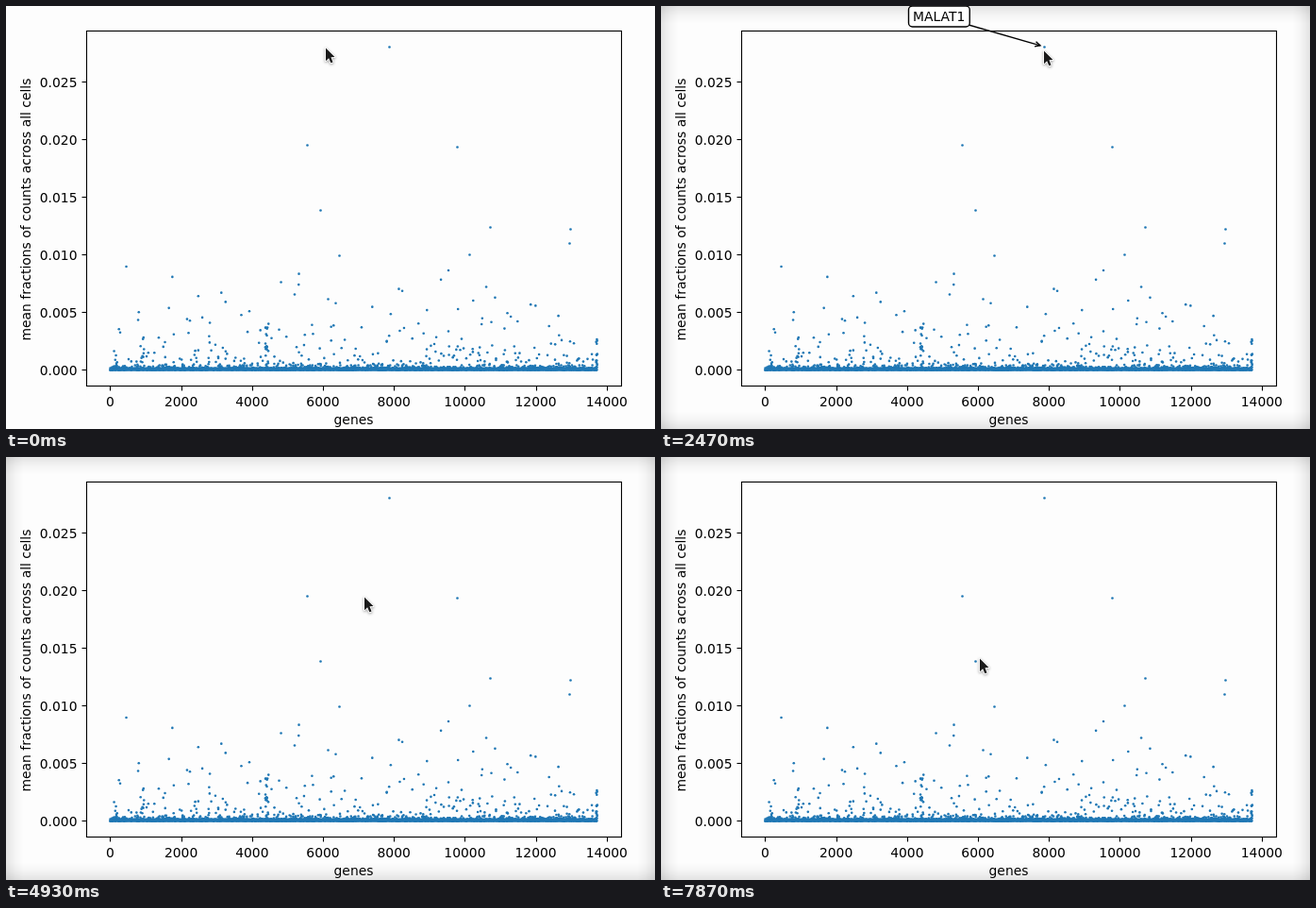
An HTML page with a canvas that plays this animation: 688x448 px, repeating every 8 s.

```html
<!DOCTYPE html>
<html lang="en">
<head>
<meta charset="utf-8">
<title>Gene fractions</title>
<style>
html, body { margin: 0; width: 688px; height: 448px; overflow: hidden; background: #fdfdfd; }
canvas { display: block; }
</style>
</head>
<body>
<canvas id="stage" width="688" height="448"></canvas>
<script>
const W = 688, H = 448, LOOP = 8000, STEP = 1000 / 15;
const FONT = '13.89px "DejaVu Sans", Verdana, sans-serif';
const BG = '#fdfdfd', BLUE = '#1f77b4';
const ctx = document.getElementById('stage').getContext('2d');

// label, data point, first and last step shown
const LABELS = [
  ['MALAT1', 406, 43, 17, 38],
  ['TMSB4X', 319, 147, 54, 70],
  ['B2M', 478, 149, 84, 107]
];

// the other points above the crowd
const OUTLIERS = [[333, 216], [513, 234], [598, 236], [597, 251], [491, 263], [353, 264]];

const smooth = p => p * p * (3 - 2 * p);
const out = p => 1 - (1 - p) * (1 - p);
const glide = p => 0.6 * smooth(p) + 0.4 * out(p);

// first step, last step, end position, easing
const START = [338, 43];
const MOVES = [
  [7, 19, [405, 46], out],
  [37, 49, [347, 146], smooth],
  [49, 55, [319, 148], out],
  [68, 82, [471, 145], smooth],
  [82, 86, [474, 143], out],
  [103, 118, [337, 212], glide]
];

function random(seed) {
  return () => (seed = (seed * 16807) % 2147483647) / 2147483647;
}

function layer(paint) {
  const c = document.createElement('canvas');
  c.width = W;
  c.height = H;
  paint(c.getContext('2d'));
  return c;
}

function line(g, ...pts) {
  g.beginPath();
  for (let i = 0; i < pts.length; i += 2) g.lineTo(pts[i], pts[i + 1]);
  g.stroke();
}

function drawPoints(g) {
  const rnd = random(4217);
  const tail = mean => -mean * Math.log(1 - rnd());
  const anyX = () => 110 + rnd() * 516;
  const dot = (x, y) => {
    g.beginPath();
    g.arc(x + 0.5, y + 0.5, 1.3, 0, 7);
    g.fill();
  };
  const column = (x, spread, top, n) => {
    for (let i = 0; i < n; i++) dot(x + rnd() * spread, top + rnd() * (382 - top));
  };
  g.fillStyle = BLUE;
  for (const [, x, y] of LABELS) dot(x, y);
  for (const [x, y] of OUTLIERS) dot(x, y);

  // counts fall off exponentially with height
  for (let i = 8; i < 170; i++) dot(anyX(), 385 - 34 * Math.log(200 / i));
  for (let i = 0; i < 90; i++) dot(anyX(), 380 - Math.min(20, tail(5)));
  for (let i = 0; i < 1500; i++) dot(anyX(), 385 - Math.min(5, tail(1.4)));
  g.fillRect(109.5, 382.5, 517.5, 4.3);
  column(274, 4, 336, 18);
  column(625, 1.5, 347, 12);
  column(144, 2, 346, 6);
}

function drawAxes(g) {
  g.strokeStyle = g.fillStyle = '#000';
  g.lineWidth = 1.1;
  g.strokeRect(85.5, 26.5, 567, 376);
  g.font = FONT;
  g.textAlign = 'center';
  for (let i = 0; i <= 7; i++) {
    const x = 110.4 + i * 75.2, tick = Math.round(x) + 0.5;
    line(g, tick, 403, tick, 407.5);
    g.fillText(String(i * 2000), x, 424);
  }
  g.fillText('genes', 368.5, 443);
  g.textAlign = 'right';
  for (let i = 0; i <= 5; i++) {
    const y = 385.5 - i * 61;
    line(g, 80.5, y, 85, y);
    g.fillText((i * 0.005).toFixed(3), 75.5, y + 5);
  }
  g.translate(26, 215.5);
  g.rotate(-Math.PI / 2);
  g.textAlign = 'center';
  g.fillText('mean fractions of counts across all cells', 0, 0);
}

function drawShade(g) {
  const edge = (x0, y0, x1, y1) => {
    const f = g.createLinearGradient(x0, y0, x1, y1);
    f.addColorStop(0, 'rgba(0,0,0,.1)');
    f.addColorStop(0.5, 'rgba(0,0,0,.04)');
    f.addColorStop(1, 'rgba(0,0,0,0)');
    g.fillStyle = f;
    g.fillRect(0, 0, W, H);
  };
  edge(0, 0, 18, 0);
  edge(W, 0, W - 18, 0);
  edge(0, 0, 0, 18);
  edge(0, H, 0, H - 18);
}

const plot = layer(g => { drawPoints(g); drawAxes(g); });
const shade = layer(drawShade);

function drawLabel(g, text, px, py) {
  g.font = FONT;
  g.fontKerning = 'normal';
  g.textAlign = 'left';
  g.lineWidth = 1.4;
  g.strokeStyle = '#000';
  const w = g.measureText(text).width + 9.5;
  const x = px - 143.5, cx = x + w / 2, cy = py - 32;
  const a = Math.atan2(py - cy, px - cx);
  const tx = px - 4.2 * Math.cos(a), ty = py - 4.2 * Math.sin(a);
  const barb = s => [tx - 6 * Math.cos(a + s), ty - 6 * Math.sin(a + s)];
  line(g, cx, cy, tx, ty);
  line(g, ...barb(0.46), tx, ty, ...barb(-0.46));
  g.beginPath();
  g.roundRect(x, cy - 11, w, 22, 4);
  g.fillStyle = '#fff';
  g.fill();
  g.stroke();
  g.fillStyle = '#000';
  g.fillText(text, x + 4.5, cy + 5);
}

function drawCursor(g, x, y) {
  g.save();
  g.translate(x + 1, y + 1.5);
  g.scale(0.88, 0.88);
  g.beginPath();
  [[0, 0], [0, 15.5], [3.6, 12.2], [6, 18], [8.6, 17], [6.2, 11.2], [10.8, 10.8]]
    .forEach(p => g.lineTo(...p));
  g.closePath();
  g.lineJoin = 'round';
  g.shadowColor = 'rgba(0,0,0,.4)';
  g.shadowBlur = 3;
  g.shadowOffsetY = 1;
  g.strokeStyle = '#fff';
  g.lineWidth = 2;
  g.stroke();
  g.shadowColor = 'transparent';
  g.fillStyle = '#1a1a1a';
  g.fill();
  g.restore();
}

function cursorAt(step) {
  let pos = START;
  for (const [from, to, end, ease] of MOVES) {
    if (step < from) break;
    const p = ease(Math.min(1, (step - from) / (to - from)));
    pos = pos.map((v, i) => v + (end[i] - v) * p);
  }
  return pos.map(Math.round);
}

function render(now) {
  const step = Math.floor((now % LOOP + 4) / STEP);
  ctx.fillStyle = BG;
  ctx.fillRect(0, 0, W, H);
  if (step >= 2) ctx.drawImage(shade, 0, 0);
  ctx.drawImage(plot, 0, 0);
  for (const [text, x, y, from, to] of LABELS) {
    if (step >= from && step <= to) drawLabel(ctx, text, x, y);
  }
  drawCursor(ctx, ...cursorAt(step));
}

let start;
function tick(now) {
  start ??= now;
  render(Math.max(0, now - start));
  requestAnimationFrame(tick);
}
render(0);
requestAnimationFrame(tick);
</script>
</body>
</html>
```
